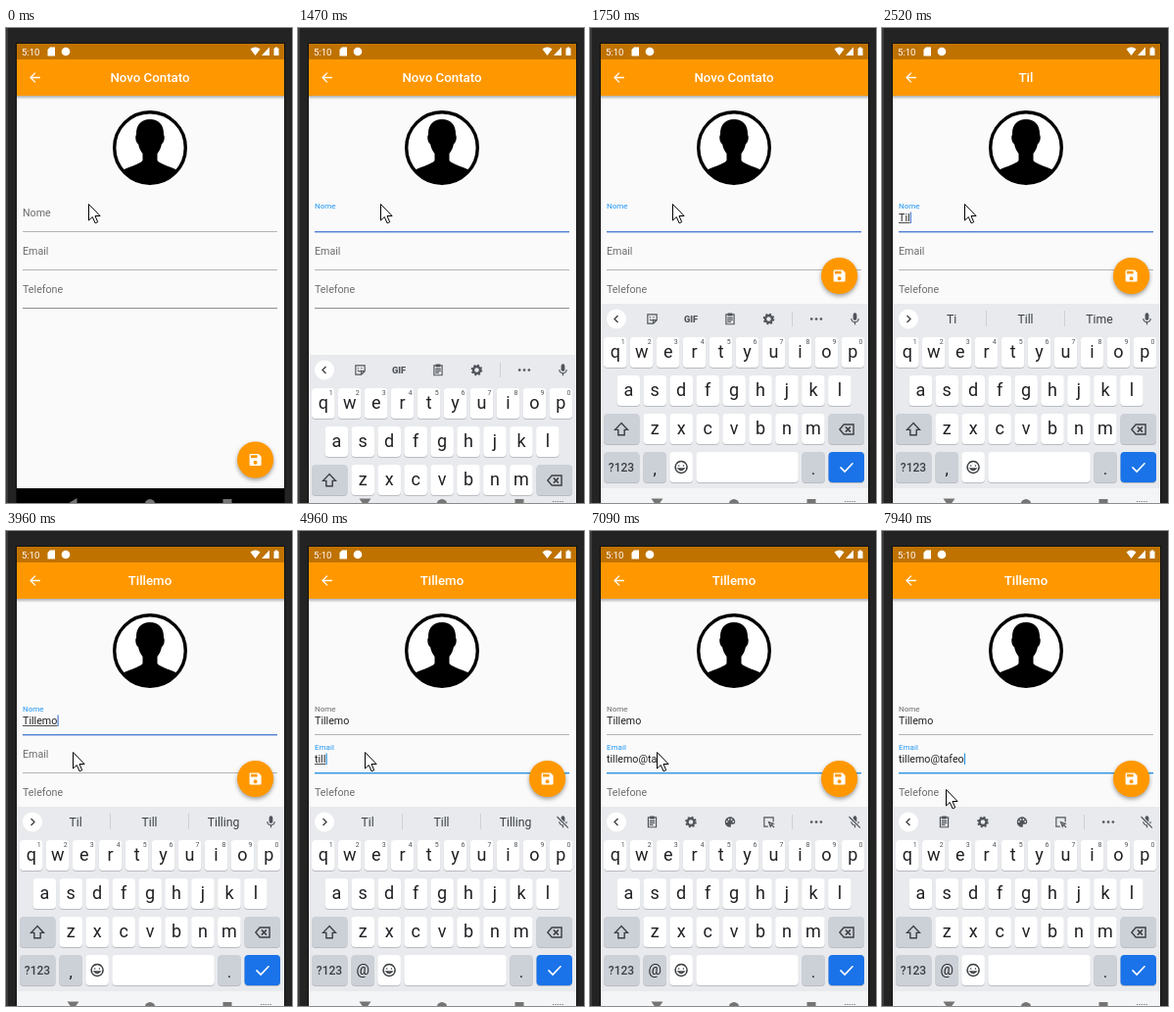
An HTML page that plays this animation: 292 px wide and 484 px high, repeating every 8 s.

```html
<!DOCTYPE html>
<html lang="pt">
<head>
<meta charset="utf-8">
<title>Novo Contato</title>
<style>
  html, body { margin: 0; width: 100%; height: 100%; overflow: hidden; background: #232323; }
  svg { display: block; width: 292px; height: 484px; font-family: Roboto, Arial, sans-serif; }
  text { white-space: pre; }
</style>
</head>
<body>
<svg id="stage" viewBox="0 0 292 484"></svg>
<script>
const NS = "http://www.w3.org/2000/svg";
const LOOP = 8000;
const ORANGE = "#ff9800", BLUE = "#2196f3", INK = "#202124", GREY = "#50545a";
const stage = document.getElementById("stage");

function el(tag, attrs = {}, parent = stage) {
  const node = document.createElementNS(NS, tag);
  for (const k in attrs) node.setAttribute(k, attrs[k]);
  parent.appendChild(node);
  return node;
}
const set = (node, attrs) => { for (const k in attrs) node.setAttribute(k, attrs[k]); };
const show = (node, on) => { node.style.display = on ? "" : "none"; };
const rect = (x, y, width, height, fill, parent, rx = 0) =>
  el("rect", { x, y, width, height, fill, rx }, parent);
const circle = (cx, cy, r, fill, parent, more = {}) =>
  el("circle", { cx, cy, r, fill, ...more }, parent);
const path = (d, fill, parent, more = {}) => el("path", { d, fill, ...more }, parent);
function label(str, x, y, size, fill, parent, more = {}) {
  const t = el("text", { x, y, "font-size": size, fill, ...more }, parent);
  t.textContent = str;
  return t;
}
const MID = { "text-anchor": "middle" };

// Icons live on a 24 unit grid; [path, outlined?]
const ICONS = {
  back: ["M20 11H7.8l5.6-5.6L12 4l-8 8 8 8 1.4-1.4L7.8 13H20z"],
  save: ["M17 3H5a2 2 0 0 0-2 2v14a2 2 0 0 0 2 2h14a2 2 0 0 0 2-2V7zM12 19a3 3 0 1 1 0-6 3 3 0 0 1 0 6zM15 9H5V5h10z"],
  mic: ["M12 14a3 3 0 0 0 3-3V5a3 3 0 0 0-6 0v6a3 3 0 0 0 3 3zm5-3a5 5 0 0 1-10 0H5.3a6.7 6.7 0 0 0 5.7 6.7V21h2v-3.3a6.7 6.7 0 0 0 5.7-6.7z"],
  slash: ["M3 4L20 21", 1],
  clip: ["M5 4H19V21H5zM9 4V2.5h6V6H9zM8 10h8M8 13.5h8M8 17h5", 1],
  sticker: ["M4 4H20V14L14 20H4zM20 14H14V20M8 9h1M14 9h1M8 13q3 3 6 0", 1],
  palette: ["M12 3a9 9 0 0 0 0 18c2 0 2-1.500 1.400-2.500C12.700 17 13.500 16 15 16h2a4 4 0 0 0 4-4c0-5-4-9-9-9zM6.500 13a1.500 1.500 0 1 1 0-3 1.500 1.500 0 0 1 0 3zM9.500 9a1.500 1.500 0 1 1 0-3 1.500 1.500 0 0 1 0 3zM14.500 9a1.500 1.500 0 1 1 0-3 1.500 1.500 0 0 1 0 3zM17.500 13a1.500 1.500 0 1 1 0-3 1.500 1.500 0 0 1 0 3z"],
  pick: ["M10 20H4V4H20V11M12 12l8 3-3.500 1.500L15 20zM16 16l5 5", 1],
  dots: ["M3 12h.1M12 12h.1M21 12h.1", 1],
  shift: ["M12 3L3 12.500H7.500V20H16.500V12.500H21z", 1],
  erase: ["M8 5H22V19H8L2 12zM11 9l6 6M17 9l-6 6", 1],
  smile: ["M12 3a9 9 0 1 0 .01 0zM8.500 9.500v.5M15.500 9.500v.5M7.500 14q4.500 5 9 0z", 1],
  check: ["M4 12.500L9.500 18L20 7", 1]
};
function icon(name, x, y, size, color, parent, weight = 2) {
  const k = size / 24, [d, outline] = ICONS[name];
  const more = { transform: `translate(${x - size / 2} ${y - size / 2}) scale(${k})`, "fill-rule": "evenodd" };
  if (outline) Object.assign(more, { stroke: color, "stroke-width": weight, "stroke-linecap": "round" });
  return path(d, outline ? "none" : color, parent, more);
}
function gear(x, y, parent) {
  circle(x, y, 3.5, "none", parent, { stroke: GREY, "stroke-width": 2.4 });
  circle(x, y, 5, "none", parent, { stroke: GREY, "stroke-width": 1.6, "stroke-dasharray": "2 1.927" });
}

// Device frame and page
rect(0, 0, 292, 484, "#232323");
rect(0, 0, 2, 484, "#3b3b3b");
rect(10, 15, 275, 469, "#111");
const defs = el("defs");
rect(11, 16, 273, 468, "#000", el("clipPath", { id: "screen" }, defs));
el("circle", { cx: 147, cy: 122, r: 36 }, el("clipPath", { id: "face" }, defs));
const fade = el("linearGradient", { id: "fade", x2: 0, y2: 1 }, defs);
el("stop", { offset: 0, "stop-color": "#000", "stop-opacity": .3 }, fade);
el("stop", { offset: 1, "stop-color": "#000", "stop-opacity": 0 }, fade);

const screen = el("g", { "clip-path": "url(#screen)" });
rect(11, 16, 273, 453, "#fafafa", screen);
rect(11, 69, 273, 4, "url(#fade)", screen);
rect(11, 32, 273, 37, ORANGE, screen);
rect(11, 16, 273, 16, "#bf7200", screen);
label("5:10", 16, 27.5, 9.6, "#fff", screen);
path("M45 19.500H50V28.500H42.500V22z", "#fff", screen);
circle(61, 24, 4.3, "#fff", screen);
path("M249.500 21.500Q254.500 17.500 259.500 21.500L254.500 28z", "#fff", screen);
path("M269 19.500V28H261z", "#fff", screen);
path("M273.500 20.500H275V19.500H277V20.500H278.500V28H273.500z", "#fff", screen);
icon("back", 29.5, 50.5, 16, "#fff", screen);
const title = label("", 147, 55.2, 13.28, "#fff", screen, { ...MID, "font-weight": 500 });

// Avatar
circle(147, 122, 36, "#fff", screen);
path("M147 93C138 93 132.500 99 133 109C131.500 110 132.500 117 135 118C136 123 138 126 139.500 128V135C137 139 122 142 116 147V162H178V147C172 142 157 139 154.500 135V128C156 126 158 123 159 118C161.500 117 162.500 110 161 109C161.500 99 156 93 147 93z",
  "#000", screen, { "clip-path": "url(#face)" });
circle(147, 122, 36.3, "none", screen, { stroke: "#000", "stroke-width": 3.4 });

// Form fields
function field(name, y, idle, active) {
  const cap = label(name, 0, 0, 10.7, "#6d6d6d", screen);
  const line = rect(17, y + 19, 260, 1, idle, screen);
  const value = label("", 17, y + 8.7, 10.7, "#222", screen);
  const under = rect(17, y + 10, 0, .8, "#222", screen);
  const caret = rect(17, y - .5, 1.2, 11.5, active, screen);
  return ({ text, raised, focus, composing, bar }) => {
    set(cap, {
      transform: `translate(17 ${y + 3.8 - 7.8 * raised}) scale(${1 - .25 * raised})`,
      fill: focus && raised ? BLUE : "#6d6d6d"
    });
    set(line, { fill: focus ? active : idle, height: focus ? 1.4 : 1 });
    if (value.textContent !== text) value.textContent = text;
    const w = text ? value.getComputedTextLength() : 0;
    set(under, { width: composing ? w : 0 });
    set(caret, { x: 17 + w + .2 });
    show(caret, bar);
  };
}
const nameField = field("Nome", 188, "#b4b4b4", "#4f7fd0");
const mailField = field("Email", 227, "#b4b4b4", "#2b93e0");
field("Telefone", 266, "#8f8f8f", BLUE)({ text: "", raised: 0 });

const fab = el("g", { style: "filter:drop-shadow(0 2px 2px rgba(0,0,0,.38))" }, screen);
circle(254.6, 0, 18.6, ORANGE, fab);
icon("save", 254.6, 0, 16, "#fff", fab);

// Keyboard
rect(11, 469, 273, 15, "#000", screen);
const board = el("g", {}, screen);
rect(11, 281, 273, 188, "#e8eaed", board);
rect(11, 469, 273, 60, "#f4f5f6", board);

function key(x, y, w, fill) {
  rect(x, y + 1, w, 31, "#b9bcc2", board, 4);
  rect(x, y, w, 31, fill, board, 4);
}
function keyRow(chars, x0, y, digits) {
  [...chars].forEach((c, i) => {
    const x = x0 + i * 26.95;
    key(x - 11.8, y, 23.6, "#fff");
    label(c, x, y + 21.3, 18, INK, board, MID);
    if (digits) label((i + 1) % 10, x + 8, y + 7, 7, GREY, board, MID);
  });
}
const DIM = "#ccd0d7";
keyRow("qwertyuiop", 25.8, 315, true);
keyRow("asdfghjkl", 39.3, 354);
keyRow("zxcvbnm", 66.2, 393);
key(14, 393, 36.5, DIM);
key(243.5, 393, 36.5, DIM);
icon("shift", 32, 409, 17, "#3c4043", board);
icon("erase", 262, 409, 17, "#3c4043", board);
key(14, 432, 36.5, DIM);
key(54.4, 432, 23.6, DIM);
key(81.3, 432, 23.6, "#fff");
key(108.3, 432, 104.5, "#fff");
key(216.3, 432, 23.6, DIM);
key(243.5, 432, 36.5, "#1a73e8");
label("?123", 32, 452, 12, "#3c4043", board, { ...MID, "font-weight": 500 });
const comma = label(",", 66.2, 455, 17, INK, board, MID);
label(".", 228, 455, 17, INK, board, MID);
icon("smile", 93.1, 447.5, 16, "#3c4043", board);
icon("check", 262, 447.5, 18, "#fff", board, 2.2);

// Strip above the keys
circle(27, 296.5, 10, "#fff", board);
const chevron = path("", "none", board, { stroke: "#3c4043", "stroke-width": 1.3 });
icon("mic", 270.5, 296.5, 15, GREY, board);
const mute = el("g", {}, board);
icon("slash", 270.5, 296.5, 15, "#e8eaed", mute, 5);
icon("slash", 270.5, 296.5, 15, GREY, mute);

function tools(build) {
  const g = el("g", {}, board);
  build(g);
  rect(206, 289, 1, 15, "#cdd0d5", g);
  icon("dots", 231, 296.5, 13, GREY, g, 5);
  return g;
}
const startTools = tools(g => {
  icon("sticker", 63.5, 296.5, 14, GREY, g);
  label("GIF", 103, 299.8, 9.2, GREY, g, { ...MID, "font-weight": 800 });
  icon("clip", 143, 296.5, 14, GREY, g);
  gear(182.5, 296.5, g);
});
const mailTools = tools(g => {
  icon("clip", 63.5, 296.5, 14, GREY, g);
  gear(103, 296.5, g);
  icon("palette", 143, 296.5, 14, GREY, g);
  icon("pick", 182.5, 296.5, 14, GREY, g);
});
const hints = el("g", {}, board);
const words = [71, 146.5, 222].map(x => label("", x, 301, 12.2, "#3c4043", hints, MID));
[106, 186].forEach(x => rect(x, 288, 1, 16, "#cdd0d5", hints));

// Navigation buttons
const nav = el("g", { fill: "#757575" }, screen);
const arrow = el("path", {}, nav);
el("circle", { cx: 147, cy: 485.3, r: 5.2 }, nav);
el("rect", { x: 221.5, y: 480, width: 9, height: 9 }, nav);
const keysIcon = path("M260 482.500H271M260 484.500H271", "none", nav,
  { stroke: "#757575", "stroke-width": 1.1, "stroke-dasharray": "1.2 1.2" });

const pointer = path("M0 0V16.500L3.800 13L6.600 19.300L9.200 18.200L6.500 12H11.600z", "#fff", stage,
  { stroke: "#000", "stroke-width": 1, "stroke-linejoin": "round" });

const NAME = "Tillemo", MAIL = "tillemo@tafeo";
const HINTS = { a: ["Ti", "Till", "Time"], b: ["Til", "Till", "Tilling"] };

// [time, what changes]; n and m count the typed letters
const STEPS = [
  [0, { n: 0, m: 0, focus: "", nameUp: 0, mailUp: 0, slide: 210, strip: "start", mail: false, plain: false, x: 84.5, y: 179.5 }],
  [800, { focus: "name" }],
  [1200, { nameUp: 1, slide: 150 }],
  [1340, { slide: 95 }],
  [1460, { slide: 52 }],
  [1600, { slide: 24 }],
  [1750, { slide: 0 }],
  [2000, { n: 1 }],
  [2250, { n: 2 }],
  [2390, { strip: "a" }],
  [2520, { n: 3 }],
  [2660, { strip: "b" }],
  [2810, { n: 4 }],
  [3100, { n: 5 }],
  [3380, { n: 6 }],
  [3810, { n: 7 }],
  [3960, { x: 68.5, y: 225.5 }],
  [4240, { focus: "mail", mailUp: .5 }],
  [4380, { mailUp: 1 }],
  [4680, { m: 1, mail: true }],
  [4960, { m: 4 }],
  [5240, { m: 5 }],
  [5490, { m: 6 }],
  [5740, { m: 7, strip: "mail" }],
  [6270, { plain: true }],
  [6420, { m: 8 }],
  [6690, { m: 9 }],
  [7090, { m: 10 }],
  [7240, { m: 11 }],
  [7520, { m: 12 }],
  [7660, { m: 13 }],
  [7800, { x: 67.5, y: 245 }],
  [7940, { x: 65.5, y: 263.5 }]
];

function draw(s) {
  const typed = NAME.slice(0, s.n), onName = s.focus === "name", onMail = s.focus === "mail";
  title.textContent = typed || "Novo Contato";
  nameField({ text: typed, raised: s.nameUp, focus: onName, composing: onName, bar: onName && s.n > 0 });
  mailField({ text: MAIL.slice(0, s.m), raised: s.mailUp, focus: onMail, composing: !s.plain, bar: onMail && s.mailUp === 1 });
  set(fab, { transform: `translate(0 ${s.slide ? 440 : 252.5})` });

  set(board, { transform: `translate(0 ${s.slide})` });
  show(board, s.slide < 200);
  const hint = HINTS[s.strip];
  show(startTools, s.strip === "start");
  show(mailTools, s.strip === "mail");
  show(hints, !!hint);
  if (hint) words.forEach((w, i) => { w.textContent = hint[i]; });
  set(chevron, { d: hint ? "M25.500 293L29 296.500L25.500 300" : "M28.500 293L25 296.500L28.500 300" });
  show(mute, s.mail);
  comma.textContent = s.mail ? "@" : ",";
  set(comma, { y: s.mail ? 452 : 455, "font-size": s.mail ? 15 : 17 });

  set(arrow, { d: s.focus ? "M62.500 479.500H74.500L68.500 488z" : "M62.500 485L72.500 479V491z" });
  show(keysIcon, !!s.focus);
  set(pointer, { transform: `translate(${s.x} ${s.y})` });
}

const states = [];
STEPS.reduce((prev, [, change]) => {
  const next = { ...prev, ...change };
  states.push(next);
  return next;
}, {});

let current = -1;
const start = performance.now();
function tick() {
  const t = (performance.now() - start) % LOOP;
  let i = STEPS.length - 1;
  while (STEPS[i][0] > t) i--;
  if (i !== current) draw(states[current = i]);
  requestAnimationFrame(tick);
}
tick();
</script>
</body>
</html>
```
